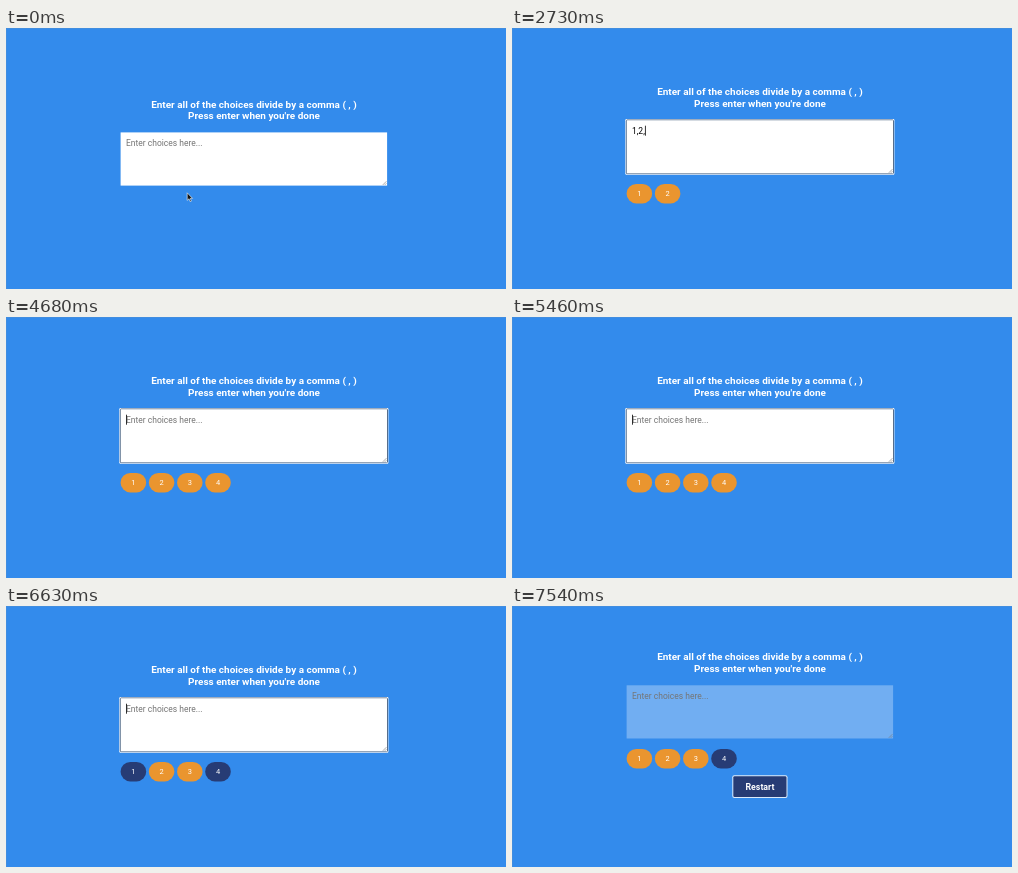
Recreate the animation shown at these times as an HTML page. Size 500x261 px, loop 8000 ms.

```html
<!DOCTYPE html>
<html lang="en">
<head>
<meta charset="utf-8">
<title>Random choice picker</title>
<style>
  html, body { margin: 0; width: 100%; height: 100%; overflow: hidden; background: #338bec; }
  svg { display: block; width: 500px; height: 261px; font-family: Roboto, sans-serif; }
  .title { font-size: 9.98px; font-weight: 700; fill: #fff; text-anchor: middle; }
  .entry { font-size: 8.53px; fill: #000; }
  .tag { font-size: 7.47px; fill: #fff; text-anchor: middle; }
  .restart { font-size: 8.8px; font-weight: 700; fill: #fff; text-anchor: middle; }
</style>
</head>
<body>
<svg viewBox="0 0 500 261">
  <path d="M.5 261V.5H500" fill="none" stroke="#4b8fd8" stroke-opacity=".6"/>
  <g id="page">
    <text class="title" x="248" y="79.6">Enter all of the choices divide by a comma ( , )</text>
    <text class="title" x="248" y="91.3">Press enter when you're done</text>
    <g id="focus">
      <rect x="113.3" y="103.1" width="269.1" height="55.7" rx="1.2" fill="#fff"/>
      <rect x="114.4" y="104.2" width="266.9" height="53.5" rx=".6" fill="none" stroke="#16365e" stroke-width="1"/>
    </g>
    <rect id="box" x="114.6" y="104.4" width="266.5" height="53.2" fill="#fff"/>
    <path d="M376.8 156.9l3.6-3.6M378.8 156.9l1.6-1.6" stroke="#777" stroke-width=".6"/>
    <text id="entry" class="entry" x="119.9" y="117.7"></text>
    <rect id="caret" y="109.8" width=".8" height="10"/>
    <g id="tags"></g>
    <g id="restart">
      <rect x="220.3" y="194.4" width="55.2" height="22.8" rx="2" fill="#dcebfb"/>
      <rect x="221.3" y="195.4" width="53.2" height="20.8" rx="1.3" fill="#273c75"/>
      <text class="restart" x="248" y="208.9">Restart</text>
    </g>
  </g>
  <path id="arrow" d="M181.2 164.8v7.6l1.8-1.6 1.2 2.8 1.2-.5-1.2-2.7h2.3z" fill="#111" stroke="#fff" stroke-width=".6"/>
  <path id="beam" d="M-1.4-3.5Q0-3.5 0-2.5Q0-3.5 1.4-3.5M0-2.5V2.5M-1.4 3.5Q0 3.5 0 2.5Q0 3.5 1.4 3.5" fill="none" stroke="#4d7190" stroke-width=".8"/>
</svg>
<script>
const LOOP = 8000, ENTER = 4290, DONE = 7410, BLINK = 520;
const $ = id => document.getElementById(id);
const [page, focusRing, box, entry, caret, tags, restart, arrow, beam] =
  ['page', 'focus', 'box', 'entry', 'caret', 'tags', 'restart', 'arrow', 'beam'].map($);

const typing = [[1820, '1,'], [2340, '1,2'], [2730, '1,2,'], [2860, '1,2,3'], [3120, '1,2,3,'], [3510, '1,2,3,4']];
// Highlighted tags at each 130 ms step of the draw
const picks = ['1', '3', '2', '', '4', '1', '3', '2', '4', '', '2', '1',
  '4', '3', '1', '2', '3', '2', '14', '14', '3', '2', '1', '3'];

tags.innerHTML = [1, 2, 3, 4].map((n, i) => {
  const x = 114.6 + i * 28.2;
  return `<g><rect x="${x}" y="168.1" width="25.6" height="19.4" rx="9.7"/>
    <text class="tag" x="${x + 12.8}" y="180.4">${n}</text></g>`;
}).join('');

const show = (el, on) => el.style.display = on ? '' : 'none';

function draw(t) {
  const done = t >= DONE, focused = t >= 260 && !done;
  const keys = typing.filter(([at]) => at <= t);
  const [lastKey, typed] = keys.length ? keys[keys.length - 1] : [390, ''];
  const text = t < ENTER ? typed : '';
  const blinkStart = t < ENTER ? lastKey : ENTER;
  const dy = done ? -25.1 : t >= 1820 ? -12.1 : 0;

  page.setAttribute('transform', `translate(0 ${dy})`);
  show(focusRing, focused);
  box.setAttribute('fill-opacity', done ? .3 : 1);
  entry.textContent = text || 'Enter choices here...';
  entry.style.fill = text ? '#000' : '#757575';
  caret.setAttribute('x', 120 + (text ? entry.getComputedTextLength() : 0));
  show(caret, focused && (t < blinkStart || Math.floor((t - blinkStart) / BLINK) % 2 === 0));

  const lit = done ? '4' : t < ENTER ? '' : picks[Math.floor((t - ENTER) / 130)];
  [...tags.children].forEach((tag, i) => {
    show(tag, typed.includes(i + 1));
    tag.firstChild.style.fill = lit.includes(i + 1) ? '#273c75' : '#ea952f';
  });

  show(restart, done);
  show(arrow, t < 130);
  show(beam, t >= 130 && t < 2080);
  beam.setAttribute('transform', t < 260 ? 'translate(170 135)' : 'translate(163.8 121.6)');
}

function tick() {
  draw(performance.now() % LOOP);
  requestAnimationFrame(tick);
}
tick();
</script>
</body>
</html>
```
